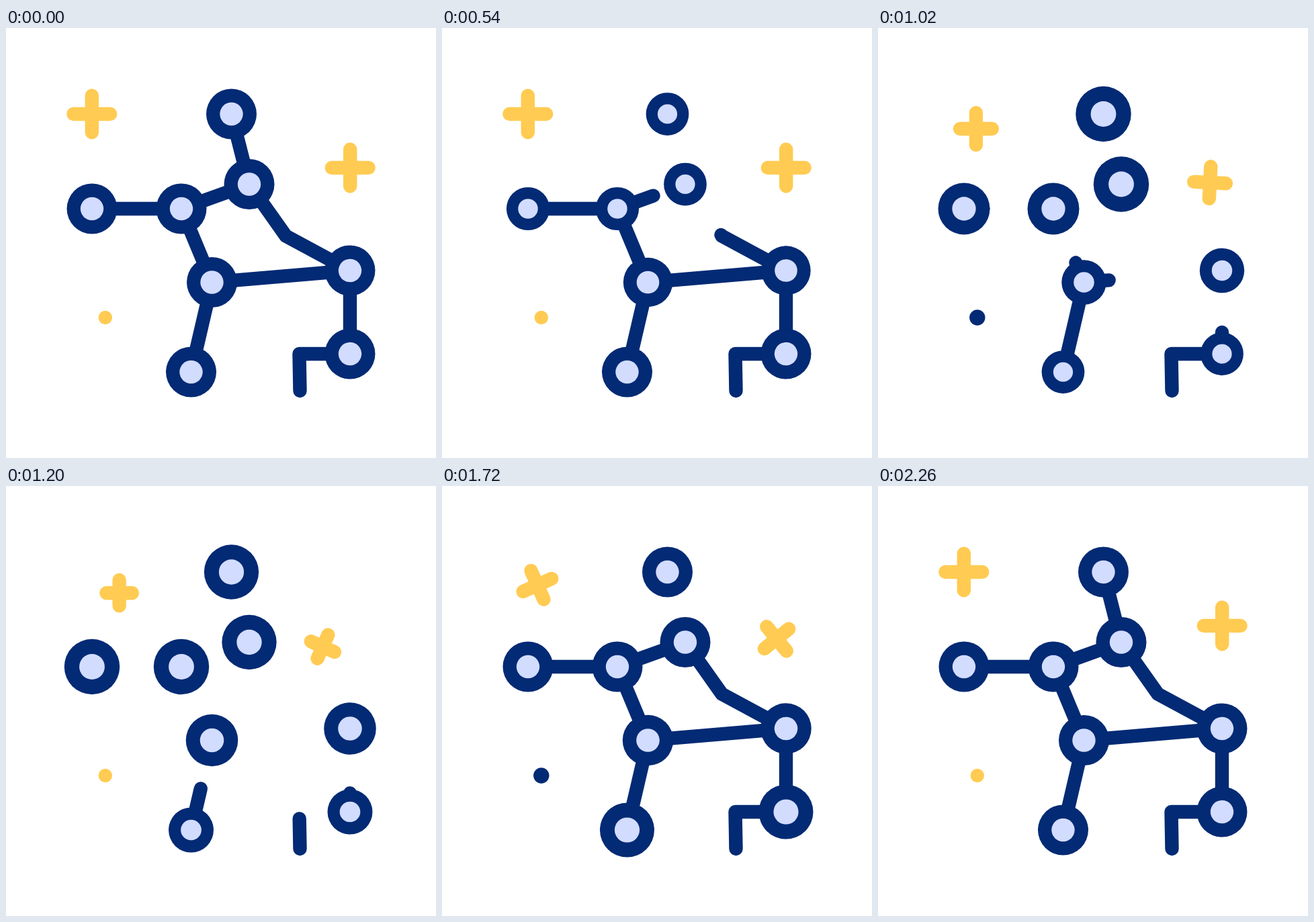
Recreate the animation shown at these times as an HTML page. Size 640 px wide and 640 px high, loop 2.4 s.

```html
<!DOCTYPE html>
<html lang="en">
<head>
<meta charset="utf-8">
<title>Constellation</title>
<style>
  html, body { margin: 0; width: 100%; height: 100%; overflow: hidden; background: #fff; }
  svg { display: block; width: 100%; height: 100%; }
  path { fill: none; stroke-width: 20.4; stroke-linecap: round; stroke-linejoin: round; }
</style>
</head>
<body>
<svg id="sky" viewBox="0 0 640 640"></svg>
<script>
const LOOP = 2400;
const NAVY = '#032a74', LILAC = '#d2dcff', GOLD = '#ffcb52';
const RING = 27.4;
const sky = document.getElementById('sky');

function add(tag, attrs, parent = sky) {
  const el = document.createElementNS('http://www.w3.org/2000/svg', tag);
  for (const k in attrs) el.setAttribute(k, attrs[k]);
  parent.appendChild(el);
  return el;
}

// Eased value at time t from steps [time, value].
function track(steps, t) {
  if (t <= steps[0][0]) return steps[0][1];
  for (let i = 1; i < steps.length; i++) {
    const [t0, a] = steps[i - 1], [t1, b] = steps[i];
    if (t < t1) {
      const u = (t - t0) / (t1 - t0);
      return a + (b - a) * u * u * (3 - 2 * u);
    }
  }
  return steps[steps.length - 1][1];
}

// x, y, wave
const stars = {
  A: [335.5, 128, 0], B: [362, 232.5, 0],
  C: [261, 269, 1], D: [128, 269, 1],
  E: [306.5, 378.5, 2], G: [512, 361, 2],
  F: [275.5, 512, 3], H: [512, 485, 3]
};

// erase start, erase end, redraw start, redraw end
const times = {
  top: [30, 363, 1715, 2045],
  upper: [388, 721, 1440, 1700],
  left: [710, 1043, 1190, 1420],
  middle: [740, 1073, 1190, 1420],
  lower: [1020, 1353, 1440, 1700]
};

// from, to, bends, timing; each is erased from its first point on
const links = [
  ['A', 'B', [], 'top'],
  ['B', 'C', [], 'upper'],
  ['B', 'G', [[416.5, 309.5]], 'upper'],
  ['C', 'D', [], 'left'],
  ['C', 'E', [], 'middle'],
  ['G', 'E', [], 'middle'],
  ['G', 'H', [], 'middle'],
  ['E', 'F', [], 'lower'],
  ['H', null, [[436.5, 485], [437.5, 540]], 'lower']
];

// Point on the ring of a star, facing p.
function rim(star, p) {
  const dx = p[0] - star[0], dy = p[1] - star[1], k = RING / Math.hypot(dx, dy);
  return [star[0] + dx * k, star[1] + dy * k];
}

const lines = links.map(([from, to, bends, timing]) => {
  const a = stars[from], b = stars[to];
  const pts = [rim(a, bends[0] || b), ...bends];
  if (b) pts.push(rim(b, bends[bends.length - 1] || a));
  const el = add('path', { d: 'M' + pts.map(p => p.join(' ')).join('L'), stroke: NAVY });
  const len = el.getTotalLength();
  const [t0, t1, t2, t3] = times[timing];
  return { el, len, steps: [[t0, 0], [t1, 1], [t2, 1], [t3, 0]] };
});

const nodes = Object.values(stars).map(([x, y, wave]) => {
  const el = add('g', {});
  add('circle', { r: 37.5, fill: NAVY }, el);
  add('circle', { r: 17.2, fill: LILAC }, el);
  const steps = [
    [136, 1], [403, 0.85], [580, 0.85], [1003, 1.1], [1125, 1.1], [1425, 1]
  ].map(([t, v]) => [t + 170 * wave, v]);
  return { el, x, y, steps };
});

const sparks = [
  { x: 127.8, y: 128, dir: 1, spin: [[1340, 0], [1917, 90]] },
  { x: 512.2, y: 208, dir: -1, spin: [[950, 0], [1340, 34], [1917, 180]] }
];
for (const s of sparks) s.el = add('path', { stroke: GOLD });
const drift = [[707, 0], [1272, 1], [1360, 1], [2080, 0]];
const arm = [[790, 27.4], [1390, 16.7], [1960, 27.4]];

const dot = add('circle', { cx: 147.8, cy: 431 });

function draw(t) {
  for (const { el, len, steps } of lines) {
    const cut = track(steps, t);
    el.style.display = cut > 0.999 ? 'none' : '';
    el.setAttribute('stroke-dasharray', cut ? `${len + 1} ${len + 1}` : 'none');
    el.setAttribute('stroke-dashoffset', -cut * len);
  }

  for (const { el, x, y, steps } of nodes)
    el.setAttribute('transform', `translate(${x} ${y}) scale(${track(steps, t)})`);

  const p = track(drift, t), bend = 2 * p * (1 - p), h = track(arm, t);
  const dx = bend * 6.5 + p * p * 44, dy = bend * 23 + p * p * 32;
  for (const { el, x, y, dir, spin } of sparks) {
    el.setAttribute('d', `M${-h} 0H${h}M0 ${-h}V${h}`);
    el.setAttribute('transform',
      `translate(${x + dir * dx} ${y + dy}) rotate(${track(spin, t)})`);
  }

  const dark = Math.floor(t / 565) % 2 === 1;
  dot.setAttribute('r', dark ? 11.7 : 10.2);
  dot.setAttribute('fill', dark ? NAVY : GOLD);
}

function tick() {
  draw(performance.now() % LOOP);
  requestAnimationFrame(tick);
}
draw(0);
requestAnimationFrame(tick);
</script>
</body>
</html>
```
